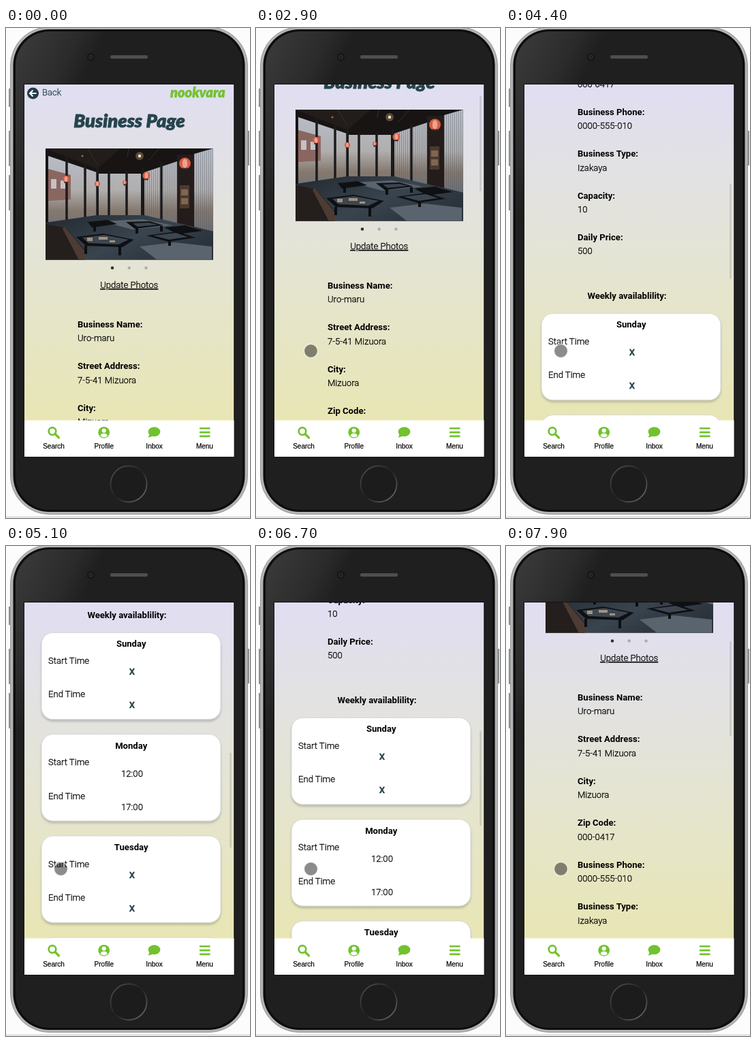
Animation of 358x720 px, one loop 8 s. Source, as an HTML page:

```html
<!DOCTYPE html>
<html lang="en">
<head>
<meta charset="utf-8">
<title>Business page</title>
<style>
html, body { margin: 0; width: 100%; height: 100%; overflow: hidden; background: #fcfcfc; }
svg { display: block; width: 358px; height: 720px; }
text { font: 300 13.1px Roboto, sans-serif; fill: #000; stroke: #000; stroke-width: .28; }
.b { font-weight: 700; stroke: none; }
.mid { text-anchor: middle; }
.back { fill: #26444d; stroke: #26444d; }
.x { font-weight: 700; fill: #2b444d; stroke: #2b444d; }
.fancy { font: italic 900 27.2px Lato, sans-serif; fill: #26444d; stroke: #26444d; stroke-width: .8; }
.brand { font-size: 20px; fill: #72c22f; stroke: #72c22f; stroke-width: .5; }
.nav text { font: 10px "Liberation Sans", Arial, sans-serif; stroke-width: .2; }
.card { fill: #fff; stroke: #d4d4d8; filter: drop-shadow(0 3px 1.5px rgba(0,0,0,.17)); }
</style>
</head>
<body>
<svg viewBox="0 0 358 720">
  <defs>
    <linearGradient id="sky" x2="0" y2="1">
      <stop stop-color="#e0def2"/><stop offset=".45" stop-color="#e4e4d6"/><stop offset=".9" stop-color="#e8e6b4"/>
    </linearGradient>
    <linearGradient id="shell" x2="1" y2="1">
      <stop stop-color="#3c3c3c"/><stop offset=".14" stop-color="#2b2b2b"/><stop offset=".2" stop-color="#1f1f1f"/>
    </linearGradient>
    <linearGradient id="ring" x2="1" y2="1">
      <stop stop-color="#555"/><stop offset=".5" stop-color="#202020"/><stop offset="1" stop-color="#777"/>
    </linearGradient>
    <linearGradient id="floor" x2="1" y2=".6">
      <stop stop-color="#222930"/><stop offset=".6" stop-color="#39444e"/><stop offset="1" stop-color="#2a323b"/>
    </linearGradient>
    <linearGradient id="street" x2="0" y2="1">
      <stop stop-color="#b9c0cb"/><stop offset=".5" stop-color="#b0aeae"/><stop offset=".75" stop-color="#85796f"/><stop offset="1" stop-color="#6d7076"/>
    </linearGradient>
    <pattern id="blind" width="3" height="9" patternUnits="userSpaceOnUse">
      <path d="M0 0h1v9h-1z" fill="#50565e" opacity=".4"/>
    </pattern>
    <pattern id="mesh" width="2" height="2" patternUnits="userSpaceOnUse">
      <path d="M0 0h1v1h-1zM1 1h1v1h-1z" fill="#6a6a6a"/>
    </pattern>
    <clipPath id="screen"><path d="M27 83h307.500v547H27z"/></clipPath>
    <clipPath id="frame"><path d="M58 177h246v163.500H58z"/></clipPath>
  </defs>

  <!-- phone -->
  <path d="M0 718.500H358" stroke="#c4c4c4"/>
  <path d="M4 89h4v27h-4zM4 151h4v52h-4zM4 216h4v52h-4zM353 151h4v51h-4z" fill="#8d8f90"/>
  <rect x="6.500" y="-1.500" width="348" height="716" rx="57" fill="#b2b4b5" stroke="#97999a"/>
  <rect x="10.500" y="2" width="340" height="709" rx="53" fill="#0d0d0d"/>
  <rect x="14" y="5" width="333" height="703" rx="50" fill="url(#shell)"/>
  <circle cx="124.500" cy="42.500" r="6" fill="#18181a"/>
  <circle cx="124.500" cy="42.500" r="2.600" fill="#1b1c28" stroke="#34353f"/>
  <rect x="153" y="40" width="55" height="5" rx="2.500" fill="#333"/>
  <rect x="153" y="40" width="55" height="5" rx="2.500" fill="url(#mesh)"/>
  <circle cx="180" cy="670" r="26.500" fill="#1c1c1c" stroke="url(#ring)" stroke-width="1.800"/>

  <path d="M26 82h309.500v549H26z" fill="#111"/>
  <g clip-path="url(#screen)">
    <path d="M27 83h307.500v547H27z" fill="url(#sky)"/>
    <g id="page">
      <circle cx="39.500" cy="96" r="8.500" fill="#243b43"/>
      <path d="M44.500 96h-9M39.500 91.500l-4.500 4.500 4.500 4.500" fill="none" stroke="#fff" stroke-width="2"/>
      <text class="back" x="53" y="99">Back</text>
      <text class="fancy brand" x="241" y="102">nookvara</text>
      <text class="fancy mid" x="181" y="145.500">Business Page</text>
      <g id="photo" clip-path="url(#frame)">
        <path d="M58 177h246v164H58z" fill="#171413"/>
        <path d="M58 177h110l-34 30z" fill="#221d1a"/>
        <path d="M62 188l71 24v64l-71 10zM136 214h62v62h-62zM203 212l48-16v92l-48-11zM276 185l28-8v122l-28-7z" fill="url(#street)"/>
        <path d="M62 207l33 9v36l-33 2z" fill="#8b6660"/>
        <path d="M66 222h8v14h-8zM80 224h7v12h-7z" fill="#c4c2c4"/>
        <path d="M203 212l48-16v92l-48-11zM276 185l28-8v122l-28-7z" fill="url(#blind)"/>
        <path d="M89 190v94M116 200v80M134 205v75M151 210v66M177 210v66M201 205v74M228 198v86" stroke="#1b1b1e" stroke-width="3.500"/>
        <path d="M251 186h25v108l-25-5z" fill="#241c1a"/>
        <path d="M255 231h14v34h-14z" fill="#4d392e"/>
        <path d="M257 237h10v9h-10zM257 250h10v9h-10z" fill="#7d6753"/>
        <path d="M58 286l75-11h70l101 24v42H58z" fill="url(#floor)"/>
        <path d="M140 284l60-3 45 9-60 6zM196 321l50-6 56 6v20h-80z" fill="#59646e"/>
        <path d="M58 288l30 6 27 31v16H58z" fill="#241e1c"/>
        <path d="M86 292l30 36v13h-9l-24-46z" fill="#4c3c33"/>
        <path d="M103 307l40-5 45 9-17 11-54-2zM120 285l29-3 14 6-37 5zM176 285l35-1 20 6-42 5zM232 293l31-3 26 8-37 5zM206 305l45-6 27 9-40 6z" fill="#0e1014"/>
        <path d="M112 308l32-4 36 7-15 7-44-2zM186 287l24-1 13 3-30 3zM216 305l33-4 18 6-28 4z" fill="#3d4650"/>
        <path d="M117 320v12M167 320v14M192 294v8M228 291v8M240 312v8M130 291v8" stroke="#0d0e12" stroke-width="4"/>
        <path d="M119 308h8v5h-8zM136 307h13v4h-13zM152 312h8v3h-8z" fill="#a3937f"/>
        <path d="M180 177l-2 12M225 177l-16 18M120 177l14 23" stroke="#37302b" fill="none"/>
        <circle cx="196" cy="188" r="6" fill="#e8c99a" opacity=".3"/>
        <circle cx="196" cy="188" r="2.200" fill="#ffe9c0"/>
        <circle cx="112" cy="188" r="1.500" fill="#8d7254"/>
      </g>
      <circle cx="156" cy="352.500" r="2.200" fill="#2c2c2c"/>
      <circle cx="180.700" cy="352.500" r="2.200" fill="#acacab"/>
      <circle cx="205.500" cy="352.500" r="2.200" fill="#acacab"/>
      <text class="mid" x="180.700" y="382" text-decoration="underline">Update Photos</text>
      <text class="b mid" x="177.500" y="956">Weekly availablility:</text>
    </g>
    <rect id="bar" x="328" width="3" height="140" rx="1.500" fill="#000" opacity=".1"/>
    <g class="nav" id="nav">
      <path d="M27 576.500h308v54H27z" fill="#fff"/>
      <g fill="#72c22f">
        <circle cx="68" cy="592.500" r="5.300" fill="none" stroke="#72c22f" stroke-width="2.700"/>
        <path d="M72 596.500l5.500 5.500" stroke="#72c22f" stroke-width="3.200" stroke-linecap="round"/>
        <circle cx="143.700" cy="594.300" r="8.400"/>
        <circle cx="143.700" cy="591.500" r="3.100" fill="#fff"/>
        <path d="M138.500 599.500q1-3.700 3.700-3.700h3q2.700 0 3.700 3.700q-5 4-10.400 0z" fill="#fff"/>
        <ellipse cx="217.500" cy="593.300" rx="8.800" ry="7"/>
        <path d="M210.500 596q0 3-2 5.500 4 0 7-2.500z"/>
        <path d="M284 587h15.500v2.600H284zM284 592.800h15.500v2.600H284zM284 598.600h15.500v2.600H284z"/>
      </g>
    </g>
    <circle id="touch" cy="474.500" r="10" fill="#000" fill-opacity=".45" stroke="#fff" stroke-opacity=".6" stroke-width="1.500"/>
  </g>
</svg>
<script>
const $ = id => document.getElementById(id);
const page = $('page'), bar = $('bar'), touch = $('touch');

function add(parent, tag, attrs, text = '') {
  const el = document.createElementNS('http://www.w3.org/2000/svg', tag);
  for (const k in attrs) el.setAttribute(k, attrs[k]);
  el.textContent = text;
  parent.append(el);
}
const write = (text, x, y, cls = '', parent = page) => add(parent, 'text', { x, y, class: cls }, text);

// paper lanterns: x, y, radius
for (const [cx, cy, r] of [[88, 222, 5], [134, 229, 4], [174, 227, 3], [206, 217, 5.5], [262.5, 199, 8.5]]) {
  add($('photo'), 'circle', { cx, cy, r, fill: '#d95b45' });
  add($('photo'), 'ellipse', { cx, cy, rx: r * .45, ry: r * .8, fill: '#eda38c' });
  add($('photo'), 'rect', { x: cx - r * .5, y: cy + r * .8, width: r, height: 2, fill: '#3c2826' });
}

[['Business Name', 'Uro-maru'], ['Street Address', '7-5-41 Mizuora'], ['City', 'Mizuora'],
 ['Zip Code', '000-0417'], ['Business Phone', '0000-555-010'], ['Business Type', 'Izakaya'],
 ['Capacity', '10'], ['Daily Price', '500']].forEach(([label, value], i) => {
  const y = 440 + i * 61.43;
  write(label + ':', 105, y, 'b');
  write(value, 105, y + 20.4);
});

['Sunday', 'Monday', 'Tuesday', 'Wednesday', 'Thursday', 'Friday', 'Saturday'].forEach((day, i) => {
  const y = 977.3 + i * 149.3, open = day === 'Monday';
  add(page, 'rect', { x: 52, y, width: 263, height: 127.5, rx: 17, class: 'card' });
  write(day, 183.7, y + 21, 'b mid');
  [['Start Time', '12:00'], ['End Time', '17:00']].forEach(([label, time], j) => {
    const row = y + 45.7 + j * 49.2;
    write(label, 62, row);
    write(open ? time : 'X', 185, row + 16.2, open ? 'mid' : 'x mid');
  });
});

['Search', 'Profile', 'Inbox', 'Menu'].forEach((name, i) => write(name, 70 + i * 73.8, 618, 'mid', $('nav')));

// scroll keys: time, offset, speed
const keys = [[2400, 0, 0], [3900, 367, .34], [5100, 850, .4], [5650, 1060, 0],
              [6100, 986, -.36], [7300, 445, -.42], [8000, 178, -.34]];

function scrollAt(t) {
  if (t <= keys[0][0]) return 0;
  const i = keys.findIndex(k => k[0] > t);
  const [t0, a, va] = keys[i - 1], [t1, b, vb] = keys[i];
  const d = t1 - t0, u = (t - t0) / d, w = 1 - u;
  return w * w * (1 + 2 * u) * a + u * u * (3 - 2 * u) * b + d * u * w * (w * va - u * vb);
}

function draw(now) {
  const t = Math.floor(now % 8000 / 100) * 100;
  const s = Math.round(scrollAt(t));
  page.setAttribute('transform', `translate(0 ${-s})`);
  bar.setAttribute('y', 85 + s * .257);
  bar.style.display = s ? '' : 'none';
  const p = Math.min(1, Math.max(0, (t - 1900) / 400));
  touch.setAttribute('cx', 14 + 66.5 * (1 - (1 - p) ** 2));
  touch.style.display = p ? '' : 'none';
  requestAnimationFrame(draw);
}
draw(performance.now());
</script>
</body>
</html>
```
